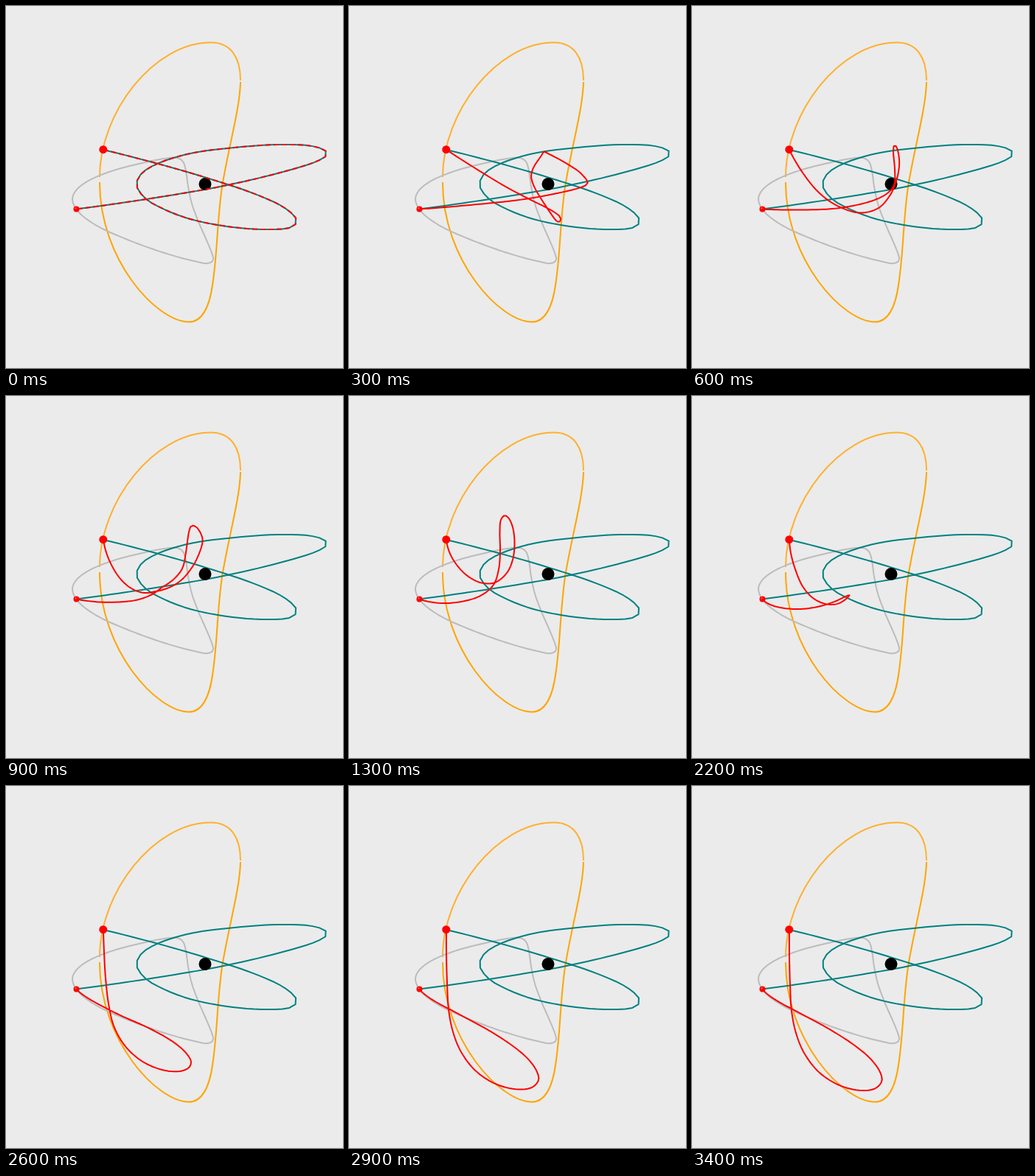
Recreate the animation shown at these times as an HTML page. Size 457 by 491 pixels, loop 8000 ms.

```html
<!DOCTYPE html>
<html lang="en">
<head>
<meta charset="utf-8">
<title>Curve relaxation</title>
<style>
  html, body { margin: 0; width: 100%; height: 100%; overflow: hidden; background: #ebebeb; }
  svg { display: block; width: 100vw; height: 100vh; }
  path { fill: none; stroke-width: 2; stroke-linejoin: round; }
</style>
</head>
<body>
<svg viewBox="0 0 457 491">
  <g stroke="#ffa500">
    <path stroke="#ffb02e" d="M127 232C127 145 200 49.5 278 49.5C305 49.5 318 70 318 101"/>
    <path d="M318 103C317 140 302 190 293 245C286 295 287 330 280.5 375C276 410 266 428.5 248 428.5C205 428.5 127 345 127 239"/>
  </g>
  <path id="grey" stroke="#bcbcbc"/>
  <path id="teal" stroke="#008080"/>
  <circle cx="270" cy="241.5" r="8.5"/>
  <path id="red" stroke="#f00"/>
  <circle cx="131.8" cy="194.7" r="5.5" fill="#f00"/>
  <circle cx="95.5" cy="275.5" r="4" fill="#f00"/>
  <circle cx="94.5" cy="274.3" r="1.1" fill="#ff6a6a"/>
</svg>
<script>
const LOOP = 8000, STEP = 100, COUNT = 120;
const byId = id => document.getElementById(id);

// Cubic Hermite spline through vectors at uneven knots.
function spline(knots, values) {
  const last = knots.length - 1;
  const dim = values[0].length;
  const slopes = [];
  for (let i = 0; i < last; i++) {
    const dt = knots[i + 1] - knots[i];
    slopes.push(values[i].map((v, k) => (values[i + 1][k] - v) / dt));
  }
  const tangents = values.map(() => []);
  for (let i = 1; i < last; i++) {
    const a = knots[i] - knots[i - 1], b = knots[i + 1] - knots[i];
    for (let k = 0; k < dim; k++)
      tangents[i][k] = (slopes[i - 1][k] * b + slopes[i][k] * a) / (a + b);
  }
  for (let k = 0; k < dim; k++) {
    tangents[0][k] = 2 * slopes[0][k] - tangents[1][k];
    tangents[last][k] = 2 * slopes[last - 1][k] - tangents[last - 1][k];
  }
  return t => {
    if (t >= knots[last]) return values[last];
    let i = 0;
    while (t >= knots[i + 1]) i++;
    const dt = knots[i + 1] - knots[i], u = (t - knots[i]) / dt;
    const h1 = u * u * (3 - 2 * u), h0 = 1 - h1;
    const g0 = u * (1 - u) * (1 - u) * dt, g1 = u * u * (u - 1) * dt;
    return values[i].map((v, k) =>
      h0 * v + h1 * values[i + 1][k] + g0 * tangents[i][k] + g1 * tangents[i + 1][k]);
  };
}

function parse(text) {
  return text.split(' ').map(p => p.split(',').map(Number));
}

function lengths(points, power) {
  const out = [0];
  for (let i = 1; i < points.length; i++) {
    const [x, y] = points[i], [px, py] = points[i - 1];
    out.push(out[i - 1] + Math.hypot(x - px, y - py) ** power);
  }
  return out;
}

// Smooth curve through the points, evenly spaced by length, as a flat vector.
function curve(text) {
  const points = parse(text);
  const knots = lengths(points, 0.5);
  const at = spline(knots, points);
  const fine = Array.from({ length: 601 }, (_, i) => at(knots[knots.length - 1] * i / 600));
  const run = lengths(fine, 1);
  const out = [];
  let j = 0;
  for (let i = 0; i <= COUNT; i++) {
    const s = run[600] * i / COUNT;
    while (j < 599 && run[j + 1] < s) j++;
    const u = (s - run[j]) / (run[j + 1] - run[j]);
    out.push(fine[j][0] + u * (fine[j + 1][0] - fine[j][0]),
             fine[j][1] + u * (fine[j + 1][1] - fine[j][1]));
  }
  return out;
}

function draw(id, flat) {
  let d = '';
  for (let i = 0; i < flat.length; i += 2)
    d += (i ? 'L' : 'M') + flat[i].toFixed(2) + ' ' + flat[i + 1].toFixed(2);
  byId(id).setAttribute('d', d);
}

const wound = curve('132,195 210,215 275,234 335,254 375,272 392,286 394.5,293 387,300 352,303 300,299 250,289 215,276 189,261 177,243 183,228 205,214 250,200 300,193 370,188 415,190 433,196 436,201 425,209 390,221 300,243 190,262 95,275.5');
const poses = [
  [0, wound],
  [600, curve('132,195 150,226 172,253 197,271 228,280.5 253,274 269,256 275,243 280,225 281,208 277.5,191.5 274.5,188.5 273,196 275,222 274,243 265,254 245,264 200,274 150,276.5 95,275.5')],
  [1300, curve('132,195 139,218 157,241 178,253 198,253 214,240 222,222 224.5,200 222,178 216,165 211,162 206,168 204.5,185 205,210 203,235 196,256 180,270 157,278 125,281 95,275.5')],
  [1800, curve('132,195 135,211 145,232 161,247 180,253 196,251 207,240 211,222 208,206 202,194 196,191 192,198 192,215 190,238 182,257 168,270 147,279 122,283 105,281 95,275.5')],
  [2200, curve('132,195 134,213 140,235 150,258 164,274 181,282 197,282 208,276 213.5,270 208,272 193,279 170,286 145,289 120,287 104,282 95,275.5')],
  [2600, curve('132,195 133,225 135,260 139,295 146,325 161,352 184,373 212,385 235,387 248,382 251,374 244,362 228,348 195,329 155,311 120,293 104,283 95,275.5')]
];

// The final stretch settles exponentially.
const loose = poses[5][1];
const tight = curve('132,195 132,230 133,270 135,305 141,335 152,362 172,388 200,406 230,413 249,410 257.5,400 255,388 243,371 222,353 190,332 150,310 118,293 103,283 95,275.5');
for (const dt of [100, 200, 300, 500, 800]) {
  const w = 1 - Math.exp(-dt / 105);
  poses.push([2600 + dt, loose.map((v, i) => v + w * (tight[i] - v))]);
}
const poseAt = spline(poses.map(p => p[0]), poses.map(p => p[1]));

draw('teal', wound);
draw('grey', curve('95,275 90,261 95,250 110,238 140,225 180,214 215,207 232,206 240,211 244,224 247,245 252,268 262,295 273,320 280,338 281,345 274,349 255,346 215,335 165,317 125,299 103,284 95,275'));

let shown = -1;
function render(ms) {
  const t = Math.floor((ms % LOOP) / STEP) * STEP;
  if (t === shown) return;
  shown = t;
  draw('red', poseAt(t));
  byId('red').setAttribute('stroke-dasharray', t ? 'none' : '7 4');
}

const start = performance.now();
function tick() {
  render(performance.now() - start);
  requestAnimationFrame(tick);
}
tick();
</script>
</body>
</html>
```
